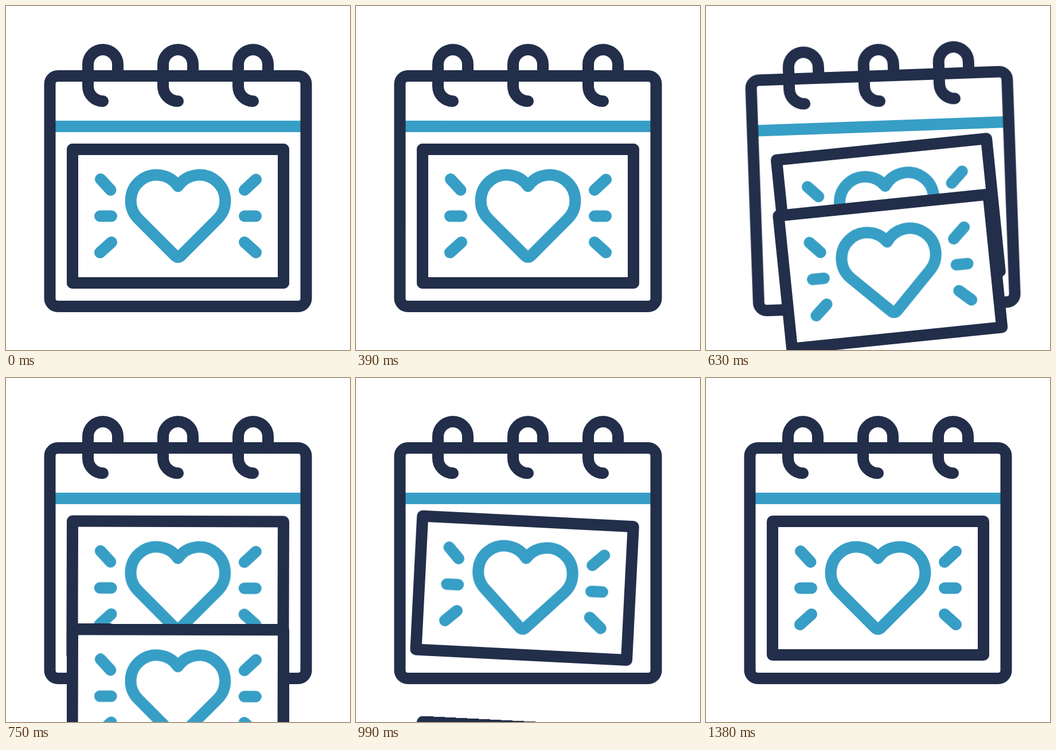
Write an HTML page that moves like this. It is 600 px wide and 600 px high and loops after 1.5 s.

```html
<!DOCTYPE html>
<html lang="en">
<head>
<meta charset="utf-8">
<title>Calendar</title>
<style>
  html, body { margin: 0; width: 100%; height: 100%; overflow: hidden; background: #fff; }
  svg { display: block; width: 100vw; height: 100vh; }

  .navy, .blue { fill: none; stroke-width: 20; stroke-linecap: round; stroke-linejoin: round; }
  .navy { stroke: #222e4a; }
  .blue { stroke: #379ec5; }
  .sheet { fill: #fff; }
  .band { stroke-linecap: butt; }

  .calendar, .fall, .page, .heart, .rays {
    animation: 1500ms cubic-bezier(.333, 0, .667, 1) infinite;
  }
  .calendar { transform-origin: 300px 80px; animation-name: sway; }
  .fall { animation-name: fall; }
  .page { transform-origin: 300px 250px; animation-name: swing; }
  .heart { transform-origin: 300px 366.5px; animation-name: beat; }
  .rays { stroke-dasharray: 1 2; animation-name: rays; }

  @keyframes sway {
    0%, 26% { transform: rotate(0deg); }
    32% { transform: rotate(2.05deg); }
    42% { transform: rotate(-2.03deg); }
    50%, 100% { transform: rotate(0deg); }
  }
  @keyframes fall {
    0%, 26% { transform: translateY(0); }
    76%, 100% { transform: translateY(400px); }
  }
  @keyframes swing {
    0%, 26% { transform: rotate(0deg); }
    40% { transform: rotate(-4.05deg); }
    60% { transform: rotate(4.27deg); }
    76%, 100% { transform: rotate(0deg); }
  }
  @keyframes beat {
    0%, 5% { transform: scale(1); }
    10% { transform: scale(.955); }
    16% { transform: scale(1.025); }
    26%, 66.7% { transform: scale(1); }
    74% { transform: scale(.955); }
    83% { transform: scale(1.025); }
    92%, 100% { transform: scale(1); }
  }
  @keyframes rays {
    0%, 5% { stroke-dashoffset: 0; }
    10%, 13% { stroke-dashoffset: 1.1; }
    26%, 66.7% { stroke-dashoffset: 0; }
    73%, 78% { stroke-dashoffset: 1.1; }
    92%, 100% { stroke-dashoffset: 0; }
  }
</style>
</head>
<body>
<svg viewBox="0 0 600 600">
  <defs>
    <path id="ring" d="M26 118V102a26 26 0 0 0-52 0V140a26 26 0 0 0 26 26"/>
  </defs>
  <g class="calendar">
    <path class="blue band" d="M86 210H514"/>
    <g class="navy">
      <rect x="76.5" y="122" width="447" height="402" rx="14"/>
      <use href="#ring" x="169"/>
      <use href="#ring" x="300"/>
      <use href="#ring" x="431"/>
    </g>
    <g class="page">
      <rect class="navy sheet" x="116" y="250" width="368" height="233"/>
      <path class="blue heart" d="M300 314.5A45 45 0 1 0 230.7 371.3L295 435.6Q300 440.6 305 435.6L369.3 371.3A45 45 0 1 0 300 314.5Z"/>
      <g class="blue rays">
        <path pathLength="1" d="M165 302L182.5 321"/>
        <path pathLength="1" d="M164 366.5H184"/>
        <path pathLength="1" d="M164 430L184 412"/>
        <path pathLength="1" d="M436 302.5L416 321"/>
        <path pathLength="1" d="M436 366.5H416"/>
        <path pathLength="1" d="M436 430L416 412"/>
      </g>
    </g>
    <g class="fall"></g>
  </g>
</svg>
<script>
  // The falling sheet is a copy of the one beneath it.
  const page = document.querySelector('.page');
  document.querySelector('.fall').append(page.cloneNode(true));
</script>
</body>
</html>
```
